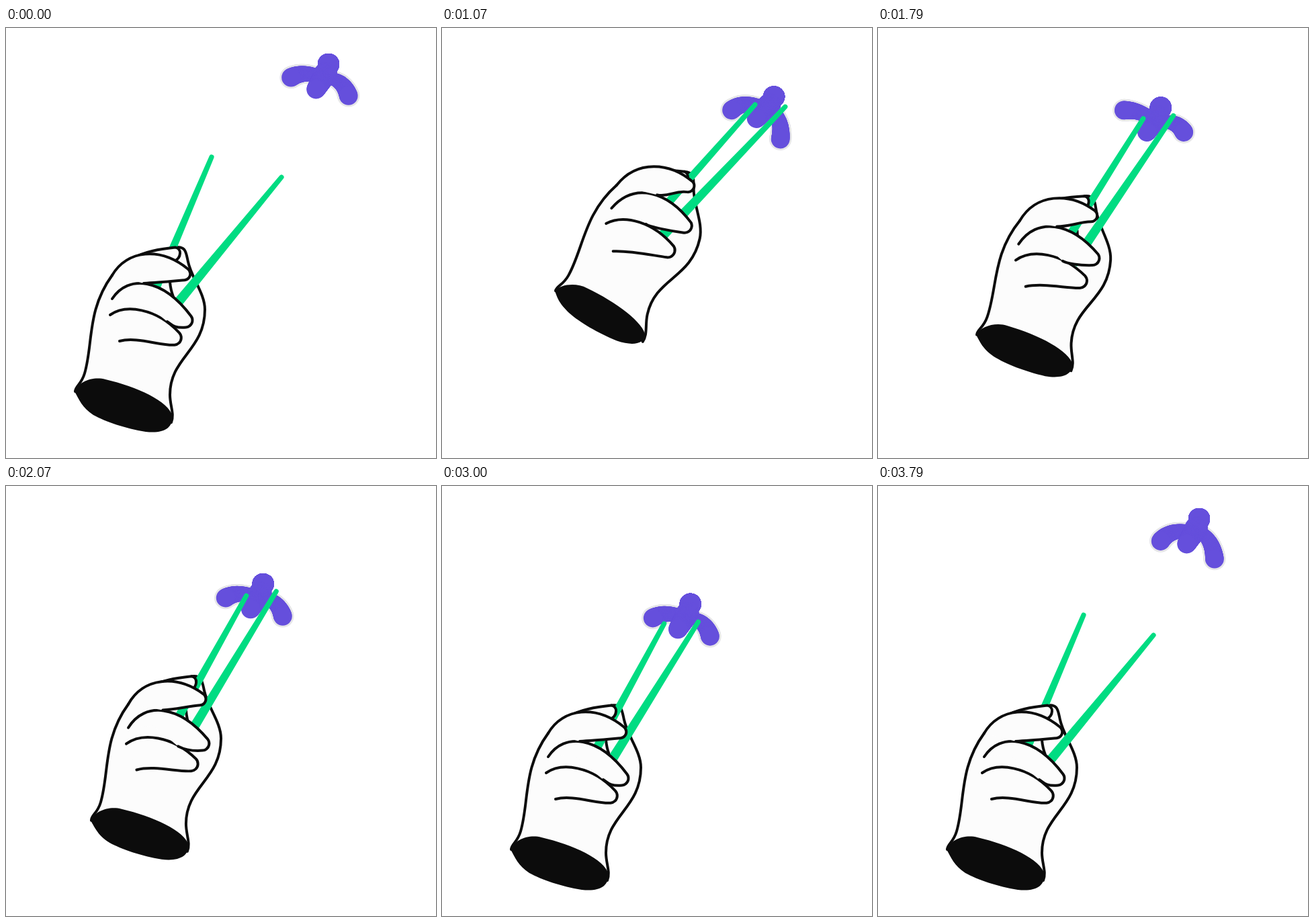
Recreate the animation shown at these times as an HTML page with a canvas. Size 640 by 640 pixels, loop 3870 ms.

```html
<!DOCTYPE html>
<html lang="en">
<head>
<meta charset="utf-8">
<title>Chopsticks and fly</title>
<style>
  html, body { margin: 0; width: 100%; height: 100%; overflow: hidden; background: #fff; }
  canvas { display: block; width: 640px; height: 640px; }
</style>
</head>
<body>
<canvas id="stage" width="640" height="640"></canvas>
<script>
const ctx = document.getElementById('stage').getContext('2d');
const LOOP = 3870, FPS = 14, LAST = 53, FLAP_PERIOD = 13 / 3;
const INK = '#0c0c0c', SKIN = '#fcfcfc', GREEN = '#00dc82', PURPLE = '#654fdc', RIM = '#e6e6e8';
const DEG = Math.PI / 180;

const mix = (a, b, u) => a + (b - a) * u;
const mixPoint = (a, b, u) => [mix(a[0], b[0], u), mix(a[1], b[1], u)];
const shift = (p, d, k = 1) => [p[0] + d[0] * k, p[1] + d[1] * k];
const polar = (p, degrees, r) => [p[0] + r * Math.cos(degrees * DEG), p[1] + r * Math.sin(degrees * DEG)];

// Smooth step from 0 at time a to 1 at time b.
function ease(t, a, b) {
  const u = Math.max(0, Math.min(1, (t - a) / (b - a)));
  return u * u * (3 - 2 * u);
}

// The hand is drawn in its resting place and turns about the wrist.
const WRIST = [102, 541], LUNGE = [66, -150], TILT = 12.4;
const GRIP = [256.5, -352];
const LEFT_EDGE = 'M103,541 C103,533 112,531 117,514 C130,470 120,420 158,368';
const BACK = 'C268,324 268,335 271,348 C276,372 296,395 296,419 C296,480 244,490 244,546 C244,562 251,575 246,587';
const THUMB = 'M186,344 C207,332 230,329 252,326.5 C262,328 261,342 251,347';

// lift moves the tip and slide the tail when the grip tightens.
const INDEX = { root: [158, 368], arch: [180, 330], tip: [265, 366], r: 9.3, aim: 39, reach: 53,
  tail: [205, 380], curl: [225, 379], lift: [-3, -20], slide: [15, -11] };
const MIDDLE = { root: [158, 403], arch: [182, 366], tip: [267, 435], r: 10.5, aim: 53, reach: 70,
  tail: [240, 437], curl: [246, 440], lift: [3, -30], slide: [-27, -22] };
const RING = { root: [155, 427], arch: [178, 411], tip: [250, 461], r: 10.8, aim: 47, reach: 51,
  tail: [169, 466], curl: [195, 459], lift: [3, -15], slide: [5, -1] };

function ink(path) {
  ctx.strokeStyle = INK;
  ctx.lineWidth = 4;
  ctx.stroke(path);
}

function fill(path, color) {
  ctx.fillStyle = color;
  ctx.fill(path);
}

function finger({ root, arch, tip, r, aim, reach, tail, curl, lift, slide }, squeeze, inner) {
  const exit = 85;
  const center = shift(tip, lift, squeeze), end = shift(tail, slide, squeeze);
  const shoulder = polar(center, aim - 90, r), under = polar(center, exit, r);
  const arch2 = shift(polar(polar(tip, aim - 90, r), aim + 180, reach), lift, 0.4 * squeeze);
  const path = new Path2D();
  path.moveTo(...root);
  path.bezierCurveTo(...shift(arch, lift, 0.3 * squeeze), ...arch2, ...shoulder);
  path.arc(...center, r, (aim - 90) * DEG, exit * DEG);
  path.bezierCurveTo(...polar(under, exit + 90, 20), ...shift(curl, slide, squeeze), ...end);
  const body = new Path2D(path);
  if (inner) body.lineTo(...inner);
  fill(body, SKIN);
  ink(path);
}

function stick(tip, end, endWidth) {
  const r = 3.6, len = Math.hypot(end[0] - tip[0], end[1] - tip[1]);
  ctx.save();
  ctx.translate(...tip);
  ctx.rotate(Math.atan2(end[1] - tip[1], end[0] - tip[0]));
  const path = new Path2D();
  path.arc(0, 0, r, Math.PI / 2, Math.PI * 1.5);
  path.lineTo(len, -endWidth / 2);
  path.lineTo(len, endWidth / 2);
  fill(path, GREEN);
  ctx.restore();
}

// The cuff opening gets slimmer as the hand tilts away.
function cuff(squeeze) {
  const path = new Path2D();
  const top = 4 * squeeze, low = -7 * squeeze;
  path.moveTo(102, 541);
  path.bezierCurveTo(108, 526 + top, 130, 518 + top, 148, 523 + top);
  path.bezierCurveTo(195, 534 + top, 242, 555 + top, 248, 578);
  path.bezierCurveTo(248, 596 + low, 234, 604 + low, 208, 601 + low);
  path.bezierCurveTo(178, 596 + low, 148, 586 + low, 130, 576 + low);
  path.bezierCurveTo(113, 565 + low, 109, 553, 102, 541);
  fill(path, INK);
}

function hand(x, y, rot, squeeze, closed) {
  ctx.save();
  ctx.translate(x, y);
  ctx.rotate(rot);
  ctx.translate(-WRIST[0], -WRIST[1]);
  fill(new Path2D(LEFT_EDGE + 'L186,344 L252,326.5' + BACK), SKIN);
  ink(new Path2D(LEFT_EDGE));
  ink(new Path2D('M252,326.5' + BACK));
  ink(new Path2D('M244,378 Q245,390 249,400'));
  stick(mixPoint([306, 192], [333.5, 206.5], closed), mixPoint([217.5, 400], [228, 396], closed), 13);
  fill(new Path2D(THUMB), SKIN);
  ink(new Path2D(THUMB));
  stick(mixPoint([410, 222], [378, 200], closed), [240, 428], 15);
  finger(RING, squeeze);
  finger(MIDDLE, squeeze, [195, 400]);
  finger(INDEX, squeeze);
  cuff(squeeze);
  ctx.restore();
}

// Tapered limb along a quadratic curve.
function limb(from, bend, to, r0, r1, color) {
  ctx.fillStyle = color;
  for (let u = 0; u <= 1; u += 1 / 40) {
    const p = mixPoint(mixPoint(from, bend, u), mixPoint(bend, to, u), u);
    ctx.beginPath();
    ctx.arc(...p, mix(r0, r1, u), 0, Math.PI * 2);
    ctx.fill();
  }
}

// Each joint is given raised and lowered, relative to the head.
const WINGS = [
  { root: [-9, 19], bend: [[-30, 1], [-44, 14]], tip: [[-55, -1], [-58, 34]] },
  { root: [4, 21], bend: [[28, 14], [21, 34]], tip: [[41, 28], [23, 61]] }
];

function bird(x, y, rot, flap) {
  ctx.save();
  ctx.translate(x, y);
  ctx.rotate(rot);
  for (const { root, bend, tip } of WINGS) {
    const joints = [root, mixPoint(...bend, flap), mixPoint(...tip, flap)];
    limb(...joints, 12, 16.8, RIM);
    limb(...joints, 9.3, 14, PURPLE);
  }
  limb([0, 0], [0, 0], [0, 0], 16, 16, PURPLE);
  limb([-4, 13], [-11, 25], [-19, 38], 17, 14, PURPLE);
  ctx.restore();
}

function draw(ms) {
  const step = Math.min(LAST, Math.floor((ms % LOOP + 3) * FPS / 1000));
  const go = ease(step, 4.4, 8.6);
  const squeeze = go - ease(step, 15.2, 36.6);
  const x = WRIST[0] + LUNGE[0] * (go - ease(step, 17.5, 36.9));
  const y = WRIST[1] + LUNGE[1] * squeeze;
  const rot = TILT * DEG * (go - ease(step, 15.5, 29.5));
  const closed = ease(step, 4.7, 8.9) - ease(step, 40.2, 49.2);
  const flap = 1 - Math.cos(Math.PI * (step - 3.68) / FLAP_PERIOD) ** 8;

  const cos = Math.cos(rot), sin = Math.sin(rot), u = step / 9.6;
  const held = [x + GRIP[0] * cos - GRIP[1] * sin, y + GRIP[0] * sin + GRIP[1] * cos];
  const place = step < 10 ? [480 + 14 * u * u, 54 + 48 * u]
    : mixPoint(held, [478, 49], ease(step, 40.2, 49.7));

  ctx.fillStyle = '#fff';
  ctx.fillRect(0, 0, 640, 640);
  ctx.lineCap = ctx.lineJoin = 'round';
  bird(...place, rot, flap);
  hand(x, y, rot, squeeze, closed);
}

const start = performance.now();
function tick() {
  draw(performance.now() - start);
  requestAnimationFrame(tick);
}
tick();
</script>
</body>
</html>
```
